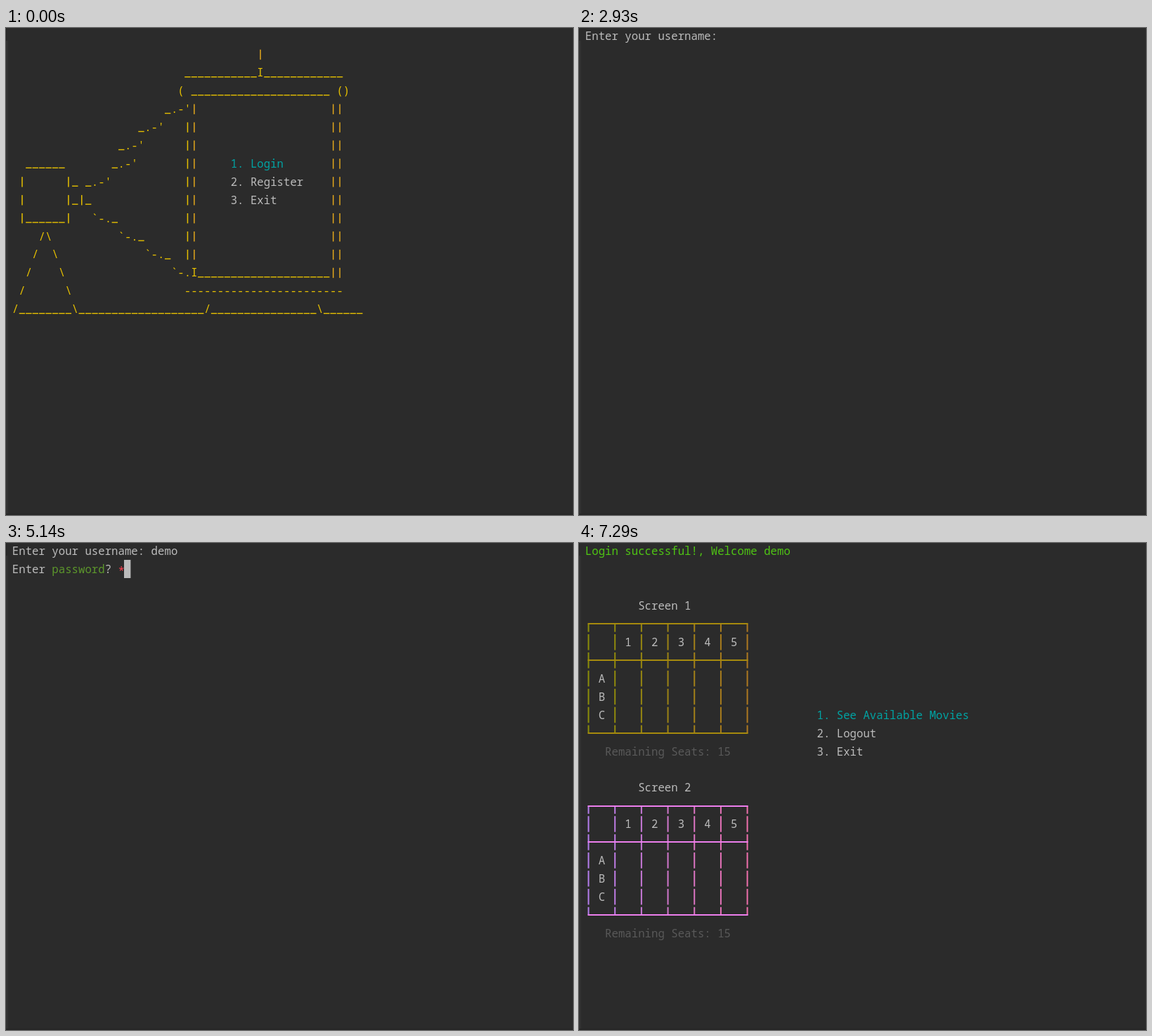
An HTML page with a canvas for the animation above (8000 ms loop, 807 px wide and 694 px high).

```html
<!DOCTYPE html>
<html lang="en">
<head>
<meta charset="utf-8">
<title>Cinema terminal</title>
<style>
  html, body { margin: 0; width: 100%; height: 100%; overflow: hidden; background: #2b2b2b; }
  canvas { display: block; }
</style>
</head>
<body>
<canvas id="stage" width="807" height="694"></canvas>
<script>
const ctx = document.getElementById('stage').getContext('2d');
const LOOP = 8000, LEFT = 8.8, CELL = 9.42, ROW = 25.92, BASE = 17.4;
const GREY = '#bbbbbb', YELLOW = '#e5bf00', CYAN = '#00a3a3';
const USER = 'demo';

const colX = col => LEFT + col * CELL;
const baseY = row => BASE + row * ROW;

function rect(x, y, w, h, color) {
  ctx.fillStyle = color;
  ctx.fillRect(x, y, w, h);
}

// Writes text into the character grid, one cell per character.
function put(col, row, text, color = GREY) {
  const y = baseY(row);
  [...text].forEach((ch, i) => {
    const x = colX(col + i), mid = x + CELL / 2;
    if (ch === '_') rect(x + 0.5, y - 0.2, CELL - 1, 1.4, color);
    else if (ch === '|') rect(mid - 0.7, y - 12.6, 1.5, 14.4, col + i > 26 ? '#e0a51c' : color);
    else {
      ctx.fillStyle = color;
      ctx.fillText(ch, mid, y + (ch === '*' ? 2.5 : 0));
    }
  });
}

function cursor(col, row) {
  const x = Math.floor(colX(col)), y = row ? 24 : 0;
  rect(x, y, 9.4, row ? 26 : 24, GREY);
}

function menu(col, row, items) {
  items.forEach((item, i) => put(col, row + i, `${i + 1}. ${item}`, i ? GREY : CYAN));
}

function projector() {
  const art = (col, row, text) => put(col, row, text, YELLOW);
  const line = n => '_'.repeat(n);

  // Screen
  art(37, 1, '|');
  art(26, 2, line(11) + 'I' + line(12));
  art(25, 3, '( ' + line(21) + ' ()');
  for (let row = 4; row < 14; row++) {
    if (row < 13) art(row === 4 ? 27 : 26, row, row === 4 ? '|' : '||');
    art(48, row, '||');
  }
  art(27, 13, 'I' + line(20));
  art(26, 14, '-'.repeat(24));

  // Light beam
  [23, 19, 16, 15, 11].forEach((col, i) => art(col, 4 + i, "_.-'"));
  [12, 16, 20, 24].forEach((col, i) => art(col, 10 + i, i < 3 ? '`-._' : '`-.'));

  // Camera and tripod
  art(2, 7, line(6));
  art(1, 8, '|      |_');
  art(1, 9, '|      |_|_');
  art(1, 10, '|______|');
  for (let i = 0; i < 5; i++) {
    art(4 - i, 11 + i, '/');
    art(5 + i, 11 + i, '\\');
  }
  art(1, 15, line(8));
  art(10, 15, line(19) + '/' + line(16) + '\\' + line(6));

  menu(33, 7, ['Login', 'Register', 'Exit']);
}

function seats(name, top, lineColor, leftColor, rightColor) {
  const x0 = colX(0.5), x1 = colX(24.5);
  const rowMid = i => 11.7 + (top + 1 + i) * ROW;
  const fade = ctx.createLinearGradient(x0, 0, x1, 0);
  fade.addColorStop(0, leftColor);
  fade.addColorStop(1, rightColor);

  put(8, top, name);
  for (let i = 0; i < 7; i++) {
    const y0 = rowMid(i) - (i === 0 ? 0 : 11.3);
    const y1 = rowMid(i) + (i === 6 ? 0 : 11.3);
    for (let col = 0; col <= 24; col += 4) rect(colX(col + 0.5) - 1, y0, 2, y1 - y0, fade);
  }
  for (const i of [0, 2, 6]) rect(x0 - 1, Math.round(rowMid(i)) - 1, x1 - x0 + 2, 2, lineColor);
  for (let n = 1; n <= 5; n++) put(2 + n * 4, top + 2, String(n));
  [...'ABC'].forEach((letter, i) => put(2, top + 4 + i, letter));
  put(3, top + 8, 'Remaining Seats: 15', '#595959');
}

function dashboard() {
  put(0, 0, 'Login successful!, Welcome ' + USER, '#4fc414');
  seats('Screen 1', 3, '#a68a0d', '#8a8d08', '#ad7820');
  seats('Screen 2', 13, '#ed7eed', '#b47ded', '#ed6fac');
  menu(35, 9, ['See Available Movies', 'Logout', 'Exit']);
}

const countPast = (times, t) => times.filter(time => t >= time).length;
const within = (t, from, to) => t >= from && t < to;

function prompts(t) {
  const typed = countPast([3540, 3680, 3880, 4070], t);
  put(0, 0, 'Enter your username: ' + USER.slice(0, typed));
  if (t < 4280) {
    if (!within(t, 2930, 3470)) cursor(21 + typed, 0);
    return;
  }
  const stars = countPast([5140, 5210, 5420, 5620], t);
  put(0, 1, 'Enter');
  put(6, 1, 'password', '#5c962c');
  put(14, 1, '?');
  put(16, 1, '*'.repeat(stars), '#ff4050');
  const hidden = within(t, 4740, 5140) || within(t, 5620, 5670) || within(t, 6690, 7220);
  if (!hidden) cursor(16 + stars, 1);
}

function draw(now) {
  const t = now % LOOP;
  ctx.font = '15.7px "Noto Sans Mono", monospace';
  ctx.textAlign = 'center';
  rect(0, 0, 807, 694, '#2b2b2b');
  rect(0, 0, 1, 18, '#222222');
  rect(0, 18, 3, 676, '#313131');
  rect(0, 692, 807, 2, '#262626');
  if (t < 2460) projector();
  else if (t < 7290) prompts(t);
  else dashboard();
}

const start = performance.now();
(function tick() {
  draw(performance.now() - start);
  requestAnimationFrame(tick);
})();
</script>
</body>
</html>
```
